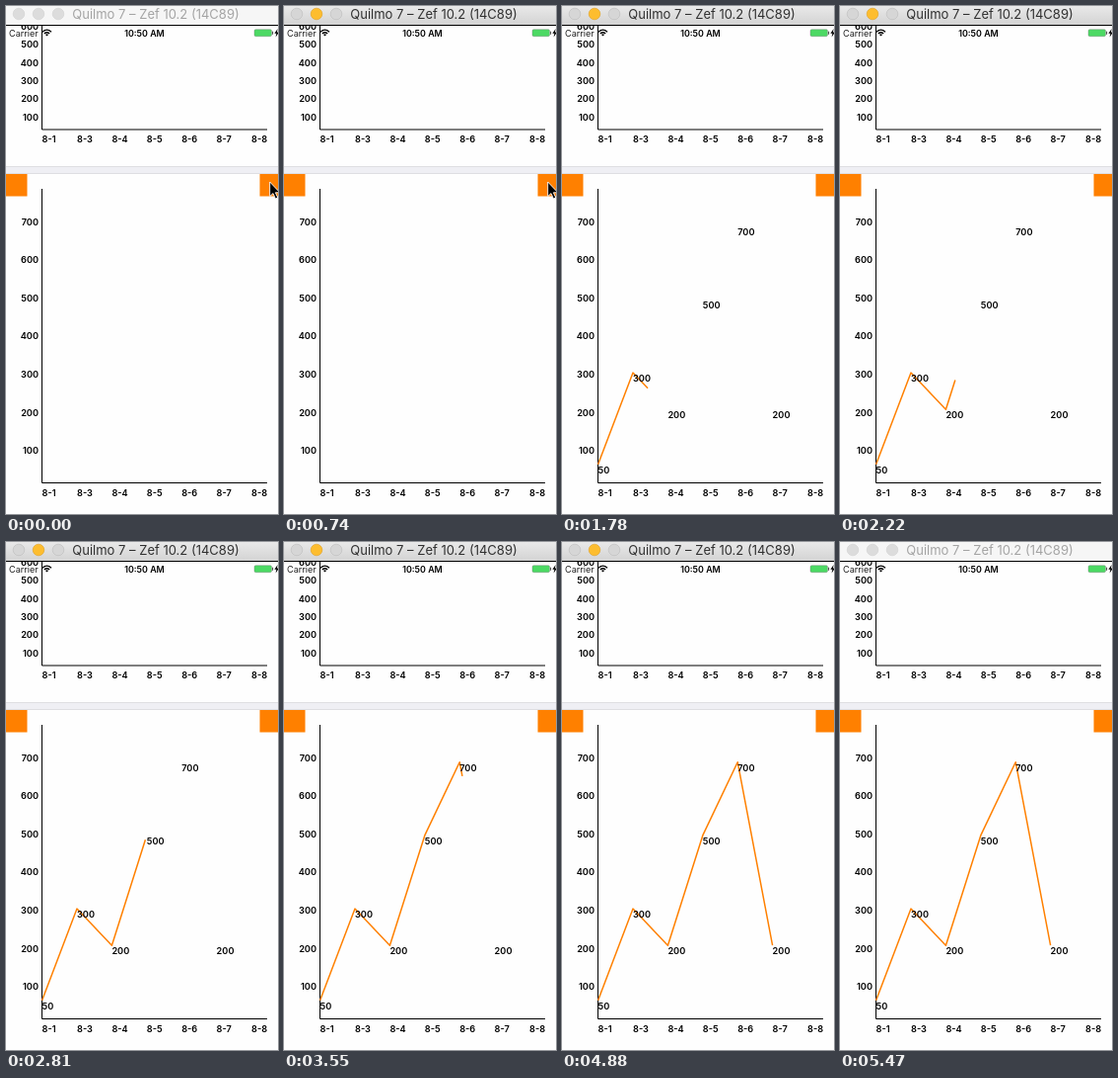
Animation of 276x514 px, one loop 5570 ms. Source, as an HTML page:

```html
<!DOCTYPE html>
<html lang="en">
<head>
<meta charset="utf-8">
<title>Line chart</title>
<style>
  html, body { margin: 0; width: 100%; height: 100%; overflow: hidden; background: #fefefe; }
  svg { display: block; width: 276px; height: 514px; }
  text { font: 600 9.2px Inter, "Noto Sans", sans-serif; fill: #000; }
  .end { text-anchor: end; }
  .axis { fill: none; stroke: #000; }
  .title { font-size: 13px; font-weight: 400; text-anchor: middle; }

  .active, .values, .cursor, .line { animation: 5570ms infinite step-end; }
  .active { animation-name: focus; }
  .values { animation-name: appear; }
  .cursor { animation-name: leave; }
  .line {
    fill: none; stroke: #ff8000; stroke-width: 1.5; stroke-linejoin: round;
    stroke-dasharray: 600 1000; animation-name: draw;
  }
  @keyframes focus {
    0%, 98.2% { visibility: hidden; }
    13.28% { visibility: visible; }
    100% { visibility: hidden; }
  }
  @keyframes appear {
    0% { visibility: hidden; }
    15.9%, 100% { visibility: visible; }
  }
  @keyframes leave {
    0% { visibility: visible; }
    29.2%, 100% { visibility: hidden; }
  }
  /* 28 even steps, beginning one step before the line shows */
  @keyframes draw {
    0% { stroke-dashoffset: 620.7; }
    13.124% { stroke-dashoffset: 620.7; animation-timing-function: steps(28, end); }
    87.451%, 100% { stroke-dashoffset: 53.7; }
  }
</style>
</head>
<body>
<svg viewBox="0 0 276 514" xmlns="http://www.w3.org/2000/svg">
  <rect width="276" height="514" fill="#fefefe"/>
  <rect y="162" width="276" height="8" fill="#efeff4"/>
  <path d="M0 162.5H276M0 169.5H276" stroke="#dedee2"/>

  <path class="axis" d="M36.5 19V125H265"/>
  <path class="axis" d="M36.5 185V482.5H265"/>
  <g id="labels"></g>

  <g fill="#ff8000">
    <rect y="170" width="21.5" height="22.5"/>
    <rect x="257.5" y="170" width="18.5" height="22.5"/>
  </g>

  <path class="line" id="line"/>
  <g class="values" id="values"></g>

  <g id="status">
    <text x="3" y="31" style="font-weight:400;font-size:9.1px;fill:#222">Carrier</text>
    <g fill="none" stroke="#000" stroke-width="1.3">
      <path d="M37 26.2Q41.5 22 46 26.2M38.8 28Q41.5 25.6 44.2 28"/>
      <path d="M40 28.9Q41.5 27.7 43 28.9L41.5 30.5Z" fill="#000" stroke="none"/>
    </g>
    <text x="140.5" y="31" text-anchor="middle" style="font-size:8.9px">10:50 AM</text>
    <rect x="252" y="23.7" width="17.5" height="7" rx="1.4" fill="#4cd964" stroke="#777" stroke-width=".4"/>
    <path d="M270.6 25.7V28.8" stroke="#444"/>
    <path d="M275.6 23L272.4 27.8H274.4L273.6 31.4L277 26.6H275Z" fill="#000"/>
  </g>

  <path class="cursor" d="M267.7 178V192.6L271 189.6L273.4 195L275.8 194L273.4 188.8H278Z"
        fill="#000" stroke="#fff" stroke-width=".9"/>

  <defs>
    <linearGradient id="bar" x2="0" y2="1">
      <stop stop-color="#e9e9e9"/><stop offset="1" stop-color="#d3d3d3"/>
    </linearGradient>
  </defs>
  <g>
    <rect width="276" height="19" fill="#f6f6f6"/>
    <g fill="#dcdcdc" stroke="#d0d0d0" stroke-width=".6">
      <circle cx="13" cy="8" r="5.8"/><circle cx="33" cy="8" r="5.8"/><circle cx="53" cy="8" r="5.8"/>
    </g>
    <text class="title" x="152" y="13" style="fill:#a4a4a4">Quilmo 7 – Zef 10.2 (14C89)</text>
  </g>
  <g class="active">
    <rect width="276" height="19" fill="url(#bar)"/>
    <g fill="#d6d6d6" stroke="#bdbdbd" stroke-width=".6">
      <circle cx="13" cy="8" r="5.8"/><circle cx="53" cy="8" r="5.8"/>
      <circle cx="33" cy="8" r="5.8" fill="#fdbd2f" stroke="#dfa023"/>
    </g>
    <text class="title" x="152" y="13" style="fill:#303030">Quilmo 7 – Zef 10.2 (14C89)</text>
  </g>
  <path d="M0 19.5H276" stroke="#000"/>
</svg>
<script>
  const byId = id => document.getElementById(id);
  const columnX = i => 36.6 + i * 35.4;
  const label = (x, middle, text, cls = "") =>
    `<text class="${cls}" x="${x}" y="${middle + 3.3}">${text}</text>`;

  const days = ["8-1", "8-3", "8-4", "8-5", "8-6", "8-7", "8-8"];
  const axisLabels = (zeroY, step, top, dayY) => {
    let out = days.map((day, i) => label(columnX(i), dayY, day)).join("");
    for (let n = 1; n <= top; n++) out += label(33, zeroY - n * step, n * 100, "end");
    return out;
  };
  byId("labels").innerHTML = axisLabels(130.6, 18.3, 6, 134.7) + axisLabels(488.4, 38.6, 7, 492.6);

  const values = [50, 300, 200, 500, 700, 200];
  const valueY = v => 482.4 - v * 0.371;
  byId("line").setAttribute("d", "M" + values.map((v, i) => `${columnX(i)} ${valueY(v)}`).join("L"));
  byId("values").innerHTML = values.map((v, i) => label(columnX(i), valueY(v) + 5.6, v)).join("");
</script>
</body>
</html>
```
